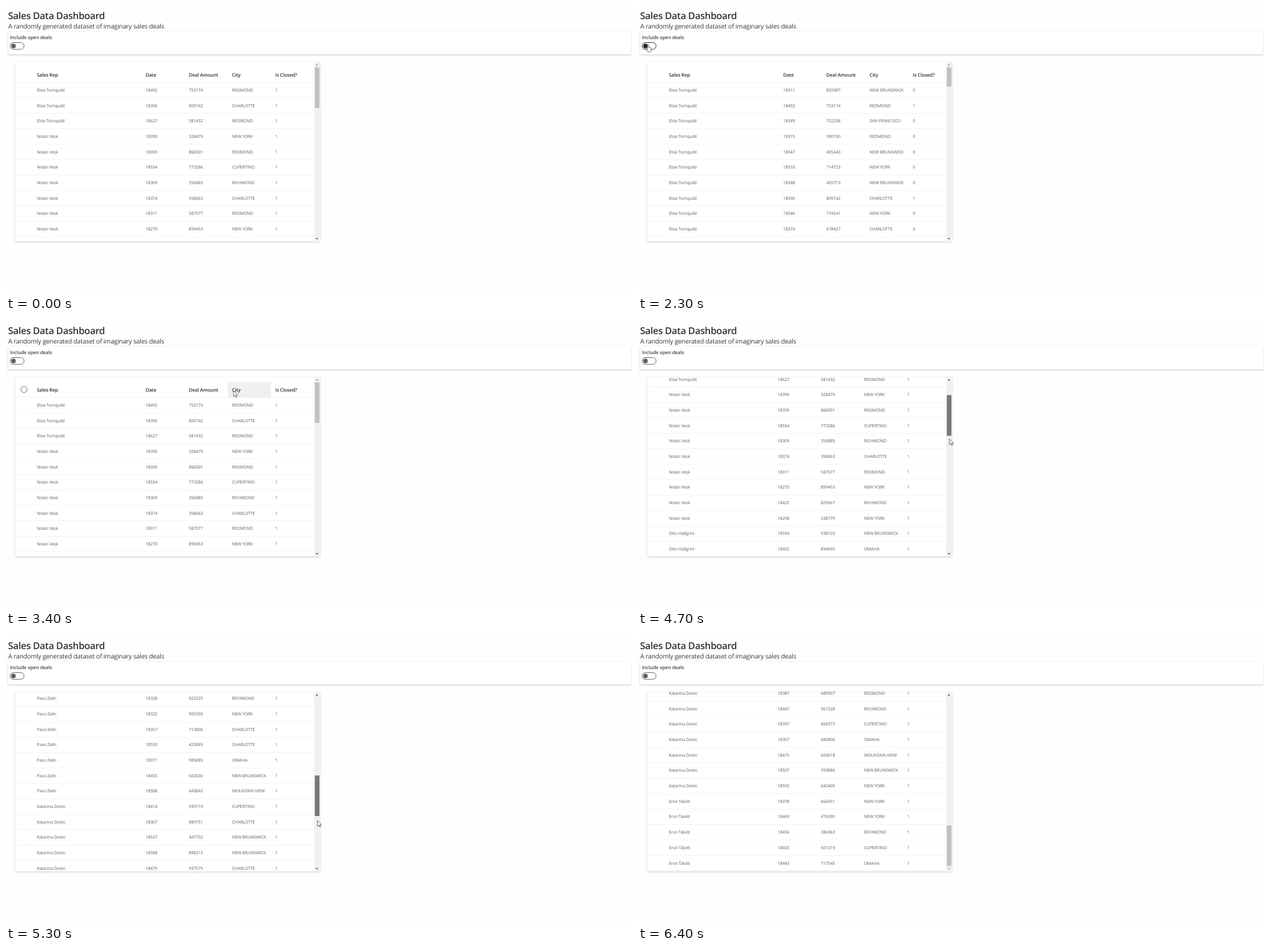
These frames come from a looping animation (999x459 px, 6800 ms). An HTML page:

```html
<!DOCTYPE html>
<html lang="en">
<head>
<meta charset="utf-8">
<title>Sales Data Dashboard</title>
<style>
  html, body { margin: 0; width: 100%; height: 100%; overflow: hidden; background: #fefefe; }
  svg { display: block; width: 999px; height: 459px; }
  text {
    font-family: "Open Sans", "Noto Sans", sans-serif;
    font-size: 6.8px; letter-spacing: -.02em; fill: #605e5c;
    text-rendering: geometricPrecision; white-space: pre;
  }
  .title { font-size: 15.2px; font-weight: 600; fill: #323130; }
  .sub { font-size: 10.2px; fill: #3b3a39; }
  .label { font-size: 7.7px; font-weight: 600; fill: #484644; }
  .head { font-size: 7.7px; font-weight: 600; fill: #323130; }
  .card { fill: #fff; filter: drop-shadow(0 1px 1.4px rgba(0, 0, 0, .2)); }
  .line { stroke: #f1f0ef; stroke-width: .8; }
  .cursor { fill: #fff; stroke: #333; stroke-width: .7; stroke-linejoin: round; }
</style>
</head>
<body>
<svg id="stage" viewBox="0 0 999 459">
  <clipPath id="view"><rect x="15" y="89" width="477" height="288"/></clipPath>
  <text class="title" x="3.3" y="20.7">Sales Data Dashboard</text>
  <text class="sub" x="3.5" y="36.2">A randomly generated dataset of imaginary sales deals</text>
  <rect class="card" x="3.5" y="41" width="994.5" height="36.3"/>
  <text class="label" x="6.4" y="53.2">Include open deals</text>
  <rect id="pill" x="6.5" y="58.5" width="22.4" height="10.8" rx="5.4" stroke-width=".9"/>
  <circle id="knob" cy="63.9" r="3.7"/>

  <rect class="card" x="15" y="89.5" width="486" height="287"/>
  <g clip-path="url(#view)">
    <g id="hover">
      <rect x="354" y="97.5" width="69" height="24.7" fill="#f0f0f0"/>
      <circle cx="28.7" cy="109.5" r="5" fill="none" stroke="#605e5c" stroke-width=".9"/>
    </g>
    <g id="closed"></g>
    <g id="all"></g>
  </g>
  <rect x="492" y="89" width="9.3" height="288" fill="#f1f1f1"/>
  <path id="up" d="M494 95.2h4.2l-2.1-2.4z"/>
  <path id="down" d="M494 371.2h4.2l-2.1 2.4z"/>
  <rect id="thumb" x="492.8" width="7.4"/>

  <path id="hand" class="cursor" d="M-.9.8a.9.9 0 0 1 1.8 0V4l3 .6q1.2.3 1.2 1.5v2.4q0 2-1 3H0q-1-.8-2.8-3.4-.8-1.5.6-1.3l1.3 1z"/>
  <path id="arrow" class="cursor" d="M0 0v9.4l2.2-2 1.5 3.2 1.4-.6-1.4-3.1h2.9z"/>
</svg>
<script>
const LOOP = 6800, STEP = 100;
const ROW = 24.67, ROW_Y = 137, LINE_Y = 122.3, MAX_SCROLL = 906.3, TRACK = 205;

const $ = id => document.getElementById(id);
const set = (el, attrs) => Object.entries(attrs).forEach(([k, v]) => el.setAttribute(k, v));
const show = (el, on) => el.style.display = on ? '' : 'none';
const within = (t, a, b) => t >= a && t < b;

function add(parent, tag, attrs, text = '') {
  const el = document.createElementNS('http://www.w3.org/2000/svg', tag);
  set(el, attrs);
  el.textContent = text;
  parent.append(el);
}

const CITIES = {
  R: 'REDMOND', C: 'CHARLOTTE', N: 'NEW YORK', U: 'CUPERTINO', I: 'RICHMOND',
  B: 'NEW BRUNSWICK', O: 'OMAHA', M: 'MOUNTAIN VIEW', S: 'SAN FRANCISCO'
};
// Sales rep and the first row after theirs
const REPS = [
  ['Elsie Tornquild', 3], ['Nolan Vesk', 12], ['Otto Hallgrim', 20],
  ['Pavo Zelin', 28], ['Katarina Dolvic', 42], ['Eron Talvitt', 47]
];

let seed = 7;
const rand = n => (seed = seed * 16807 % 2147483647) % n;
const randomDeals = n => Array.from({ length: n }, () =>
  `${18262 + rand(366)} ${300000 + rand(699999)} ${'RCNUIBOM'[rand(8)]}`);
const deals = text => text.trim().split(/\s*,\s*/);

const closedDeals = [
  ...deals(`18492 753174 R, 18390 809742 C, 18627 581432 R, 18390 328479 N, 18359 868301 R,
    18554 773286 U, 18309 356885 I, 18374 358663 C, 18311 587077 R, 18270 899453 N`),
  ...randomDeals(1),
  ...deals(`18298 538779 N, 18594 938103 B, 18452 894695 O, 18605 881867 N, 18436 540988 C,
    18455 438452 O, 18398 356129 M, 18593 575124 B, 18361 859172 M, 18266 968498 O,
    18328 923325 I, 18322 900390 N`),
  ...randomDeals(12),
  ...deals(`18387 689907 R, 18447 961528 I, 18397 869373 U, 18307 680806 O, 18475 600618 M,
    18507 393886 B, 18592 640400 N, 18378 664351 N, 18469 474390 N, 18456 384363 I,
    18603 601319 U, 18443 717545 O`)
];
const allDeals = deals(`18311 855987 B 0, 18492 753174 R, 18549 702208 S 0, 18315 590190 R 0,
  18547 405443 B 0, 18553 714723 N 0, 18588 455713 B 0, 18390 809742 C, 18546 774241 N 0,
  18374 678427 C 0`);

function buildTable(group, list, shift, repOf) {
  const columns = [49.3, ...[222.8, 291.7, 360.7, 429.7].map(x => x + shift)];
  const putRow = (cells, y, cls) =>
    cells.forEach((cell, i) => add(group, 'text', { x: columns[i], y, class: cls }, cell));
  const putLine = i => {
    const y = LINE_Y + ROW * i;
    add(group, 'line', { x1: 15, x2: 492, y1: y, y2: y, class: 'line' });
  };
  putRow(['Sales Rep', 'Date', 'Deal Amount', 'City', 'Is Closed?'], 112.9, 'head');
  list.forEach((deal, i) => {
    const [date, amount, city, isClosed = '1'] = deal.split(' ');
    putLine(i);
    putRow([repOf(i), date, amount, CITIES[city], isClosed], ROW_Y + ROW * i, 'cell');
  });
  putLine(list.length);
}
buildTable($('closed'), closedDeals, 0, i => REPS.find(([, end]) => i < end)[0]);
buildTable($('all'), allDeals, 8.9, () => REPS[0][0]);

// [time, values...]
const CURSOR = [
  [800, 16, 61.8], [3100, 16, 61.8], [3200, 62, 69], [3300, 205, 88], [3400, 363.3, 111.5],
  [3500, 478, 136], [3600, 535, 152], [3700, 535, 152], [3800, 537, 159], [3900, 531, 153],
  [4000, 517, 141], [4100, 503, 133], [4200, 503, 133], [4300, 498, 150], [4400, 497, 162],
  [4500, 497, 166], [4900, 497, 211], [5100, 497, 239], [5300, 497, 295], [5600, 496.5, 367],
  [5700, 497, 374], [5800, 497.5, 378], [5900, 497.5, 378], [6000, 505, 390]
];
const DRAG = [
  [4400, 0], [4500, 3], [4600, 10], [4800, 31], [5100, 71.1],
  [5300, 125], [5500, 182], [5600, 202.4], [5700, 204.3], [5800, 205]
];
const KNOB = [[1000, 11.9], [1100, 17.5], [1200, 23.4], [2100, 23.4], [2200, 15], [2300, 11.9]];

function sample(keys, t) {
  const i = keys.findIndex(k => k[0] > t);
  if (i === 0) return keys[0].slice(1);
  if (i < 0) return keys[keys.length - 1].slice(1);
  const a = keys[i - 1], b = keys[i], p = (t - a[0]) / (b[0] - a[0]);
  return a.slice(1).map((v, j) => v + (b[j + 1] - v) * p);
}

function render(t) {
  const on = within(t, 1100, 2200);
  const overToggle = within(t, 800, 3200);
  const ink = overToggle ? '#252423' : '#605e5c';
  set($('pill'), { fill: on ? '#4a4c4e' : '#fff', stroke: on ? '#4a4c4e' : ink });
  set($('knob'), { cx: sample(KNOB, t)[0], fill: on ? '#fff' : ink });

  const showAll = within(t, 1600, 2700);
  show($('all'), showAll);
  show($('closed'), !showAll);
  show($('hover'), within(t, 3400, 3500));

  const [drag] = sample(DRAG, t);
  const dragging = within(t, 4400, 6000);
  set($('closed'), { transform: `translate(0 ${-drag * MAX_SCROLL / TRACK})` });
  set($('thumb'), {
    y: 98 + drag, height: showAll ? 31 : 65,
    fill: dragging ? '#787878' : within(t, 4300, 4400) ? '#a8a8a8' : '#c1c1c1'
  });
  set($('up'), { fill: drag > 0 ? '#505050' : '#a3a3a3' });
  set($('down'), { fill: drag < TRACK ? '#505050' : '#a3a3a3' });

  const [x, y] = sample(CURSOR, t);
  show($('hand'), overToggle);
  show($('arrow'), within(t, 3200, 6100));
  for (const id of ['hand', 'arrow']) set($(id), { transform: `translate(${x} ${y})` });
}

const start = performance.now();
function tick() {
  const t = (performance.now() - start) % LOOP;
  render(Math.floor(t / STEP) * STEP);
  requestAnimationFrame(tick);
}
tick();
</script>
</body>
</html>
```
